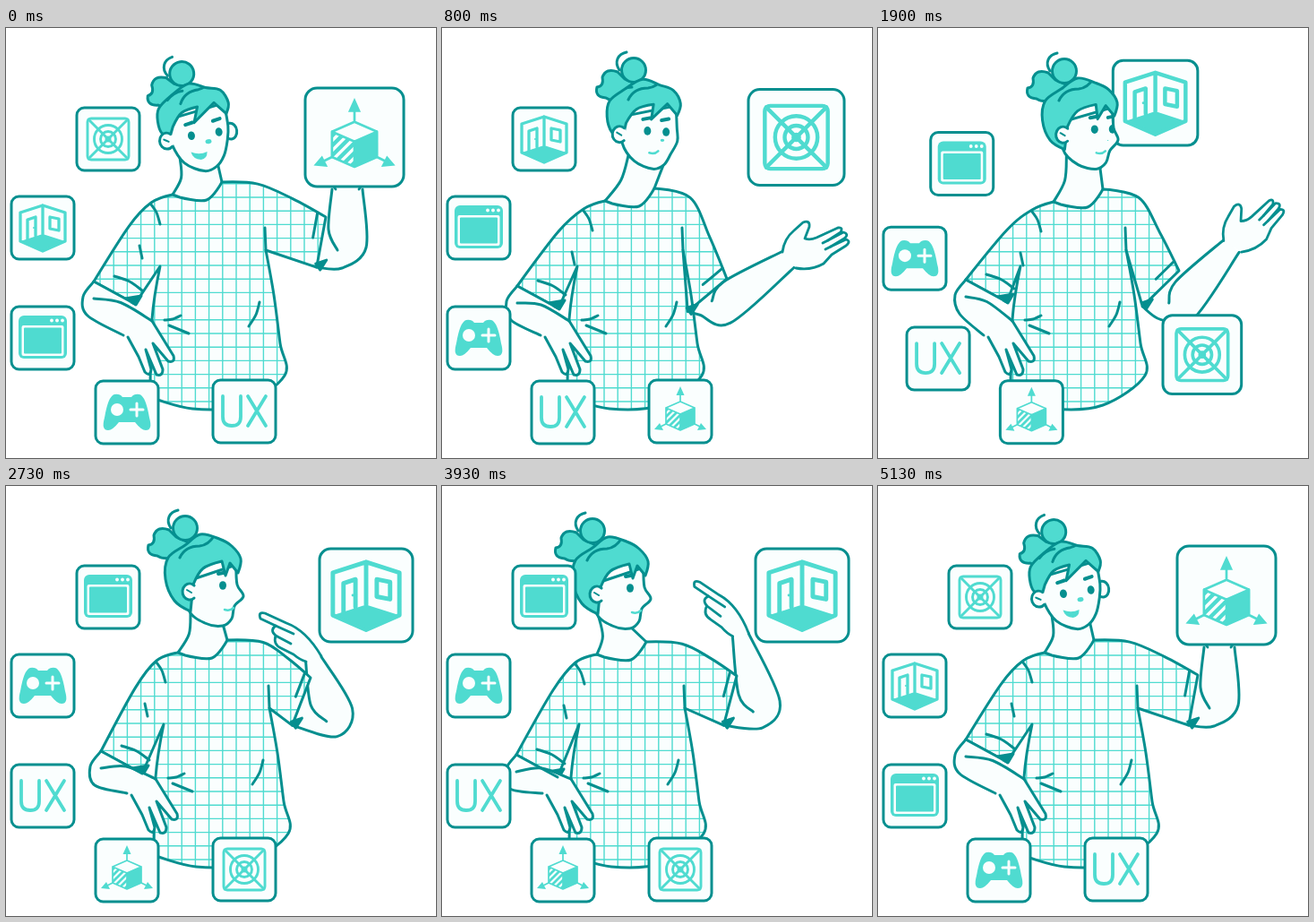
Animation of 480 by 480 pixels, one loop 5210 ms. Source, as an HTML page with a canvas:

```html
<!DOCTYPE html>
<html lang="en">
<head>
<meta charset="utf-8">
<title>Designer and floating tiles</title>
<style>
  html, body { margin: 0; width: 100%; height: 100%; overflow: hidden; background: #fff; }
  canvas { display: block; width: 480px; height: 480px; }
</style>
</head>
<body>
<canvas id="stage" role="img" aria-label="A designer sorting tiles: 3D, target, room, browser, games, UX"></canvas>
<script>
const LOOP = 5210, DARK = '#058f8f', MINT = '#4fdbd0', PALE = '#fafefe';
const canvas = document.getElementById('stage');
const ctx = canvas.getContext('2d');
const dpr = window.devicePixelRatio || 1;
canvas.width = canvas.height = 480 * dpr;

/* ---------- maths ---------- */
const clamp = (v, a = 0, b = 1) => Math.min(b, Math.max(a, v));
const mix = (a, b, p) => Array.isArray(a) ? a.map((v, i) => mix(v, b[i], p)) : a + (b - a) * p;
const add = (a, b) => [a[0] + b[0], a[1] + b[1]];
const sub = (a, b) => [a[0] - b[0], a[1] - b[1]];
const unit = v => v.map(c => c / Math.hypot(...v));
const spin = ([x, y], a) => [x * Math.cos(a) - y * Math.sin(a), x * Math.sin(a) + y * Math.cos(a)];
// step from a point: u along a unit vector, n across it
const step = (p, dir, u, n) => [p[0] + dir[0] * u - dir[1] * n, p[1] + dir[1] * u + dir[0] * n];
const span = (t, a, b) => clamp((t - a) / (b - a));
const inOut = x => x < .5 ? 2 * x * x : 1 - 2 * (1 - x) ** 2;
const outBack = x => 1 + 3.6 * (x - 1) ** 3 + 2.6 * (x - 1) ** 2;
const inBack = x => 2.9 * x ** 3 - 1.9 * x * x;
const points = s => s.split(' ').map(p => p.split(',').map(Number));

/* ---------- drawing helpers ---------- */
function spline(pts, closed = false, corners = []) {
  const n = pts.length, path = new Path2D();
  const at = i => closed ? pts[(i + n) % n] : pts[clamp(i, 0, n - 1)];
  const tangent = i => corners.includes(i % n) ? [0, 0] : sub(at(i + 1), at(i - 1)).map(v => v / 6);
  path.moveTo(...pts[0]);
  for (let i = 0; i < (closed ? n : n - 1); i++)
    path.bezierCurveTo(...add(at(i), tangent(i)), ...sub(at(i + 1), tangent(i + 1)), ...at(i + 1));
  if (closed) path.closePath();
  return path;
}
const svg = d => new Path2D(d);
function fill(path, color) { ctx.fillStyle = color; ctx.fill(path); }
function stroke(path, color = DARK, width = 3) {
  ctx.strokeStyle = color;
  ctx.lineWidth = width;
  ctx.stroke(path);
}
function line(a, b, color, width) { stroke(spline([a, b]), color, width); }
function shape(path, color = PALE) { fill(path, color); stroke(path); }
function oval(x, y, rx, ry = rx, from = 0, to = 7) {
  const p = new Path2D();
  p.ellipse(x, y, rx, ry, 0, from, to);
  return p;
}
function box(x, y, w, h, r) {
  const p = new Path2D();
  p.roundRect(x, y, w, h, r);
  return p;
}
function placed([x, y], draw, turn = 0, scale = 1) {
  ctx.save();
  ctx.translate(x, y);
  ctx.rotate(turn * Math.PI / 180);
  ctx.scale(scale, scale);
  draw();
  ctx.restore();
}
function clipped(path, draw) {
  ctx.save();
  ctx.clip(path);
  draw();
  ctx.restore();
}

/* ---------- poses ---------- */
// turn: 0 faces us, 1 is profile; shift: sideways sway of the torso
const HOLD = { head: [216, 120], tilt: -8, turn: 0, neck: [241, 172], shift: 0, cuffL: [98, 283],
  cuffR: [357, 211], elbow: [381, 245], wrist: [381, 180], girth: 17, hand: 'hold', palm: 0 };
const OFFER = { head: [224, 118], tilt: 0, turn: .35, neck: [237, 179], shift: -21, cuffL: [84, 288],
  cuffR: [318, 280], elbow: [310, 312], wrist: [387, 258], girth: 11, hand: 'open', palm: 0 };
const SWEEP = { ...OFFER, head: [218, 119], turn: .8, neck: [251, 180], shift: -13, cuffL: [98, 281],
  cuffR: [336, 271], elbow: [335, 312], wrist: [395, 243], palm: -18 };
const POINT = { head: [210, 118], tilt: 0, turn: 1, neck: [247, 172], shift: 4, cuffL: [106, 296],
  cuffR: [340, 214], elbow: [367, 256], wrist: [343, 193], girth: 9, hand: 'point', palm: 0 };
const LEAN = { ...POINT, head: [178, 121], neck: [228, 174], shift: -19, cuffL: [83, 300],
  cuffR: [329, 212], elbow: [357, 246], wrist: [333, 166], palm: 9 };
const LIFT = { ...HOLD, head: [238, 120], tilt: 0, neck: [259, 174], shift: 5, cuffL: [108, 270],
  cuffR: [355, 248], elbow: [365, 283], wrist: [393, 203], girth: 13 };

const KEYS = [[0, HOLD], [40, HOLD], [700, OFFER], [1250, OFFER], [1900, SWEEP], [1960, SWEEP],
  [2600, POINT], [2900, POINT], [3800, LEAN], [3960, LEAN], [4600, LIFT], [4740, LIFT], [5130, HOLD], [LOOP, HOLD]];

function poseAt(t) {
  const i = Math.max(1, KEYS.findIndex(([time]) => t < time));
  const [[from, a], [to, b]] = [KEYS[i - 1], KEYS[i]];
  const p = inOut(span(t, from, to)), pose = {};
  for (const k in a) pose[k] = k === 'hand' ? (p < .5 ? a : b).hand : mix(a[k], b[k], p);
  return pose;
}

/* ---------- body ---------- */
const SHIRT_CORNERS = [0, 3, 4, 5, 7, 13, 14, 15, 18, 20];

// the whole shirt follows from the neck, the sway and the two cuffs
function shirtOf({ neck, shift, cuffL, cuffR }) {
  const low = s => points(s).map(([x, y]) => [x + shift, y]);
  const shoulderL = add(neck, [-79, 23]);
  const shoulderR = add(neck, [40, 2 + .12 * (cuffR[1] - 210)]);
  const cuffDir = spin(unit(sub(cuffR, shoulderR)), 1.3);
  return [
    add(neck, [-55, 14]), shoulderL, add(mix(shoulderL, cuffL, .35), [-2, -5]),
    cuffL, add(cuffL, [46, 25]),
    ...low('172,266 163,325 161,412 208,425 264,421 311,388 306,352 299,298 290,248'),
    step(cuffR, cuffDir, 57, 0), cuffR, add(mix(shoulderR, cuffR, .5), [1, -2]), shoulderR,
    neck, add(neck, [-17, 20]), add(neck, [-47, 17])
  ];
}

const HANDS = {
  hold: [svg('M-13,0L-22,-13L-27,-34H25L21,-12L13,0'),
    svg('M-14,-34Q-13,-21 -7,-23Q-2,-25 -3,-34M8,-34Q10,-24 14,-34')],
  open: [svg('M-7,-8Q-5,-23 6,-32L16,-41Q24,-44 23,-36L18,-23Q24,-21 31,-24L55,-35Q61,-36 58,-30L44,-21L61,-30Q68,-28 62,-23L47,-14L64,-22Q70,-20 64,-15L48,-5L39,5Q25,13 8,10'),
    svg('M44,-21L38,-18M47,-14L41,-11')],
  point: [svg('M9,-3Q-8,-32 -30,-40L-54,-51Q-62,-53 -59,-45L-42,-37Q-49,-32 -42,-26Q-45,-16 -36,-12L-22,-5Q-15,1 -8,3'),
    svg('M-42,-37L-22,-28M-42,-26L-25,-17')]
};
const HIP_HAND = svg('M163,324L187,363Q189,371 181,369L164,349L175,378Q175,386 168,384L156,356L162,378Q161,387 155,381L148,364L136,342');

function drawArm({ elbow, wrist, girth, hand, palm }, shirt) {
  const dir = unit(sub(wrist, elbow));
  const outer = [shirt[14], step(elbow, dir, -23, -6), step(elbow, dir, 0, 21), step(wrist, dir, 0, girth)];
  const inner = [step(wrist, dir, 0, -girth), step(elbow, dir, 20, -21), step(elbow, dir, -3, -11)];
  fill(spline([...outer, ...inner.slice(0, 2), shirt[15]], true, [0, 3, 4, 6]), PALE);
  stroke(spline(outer));
  stroke(spline(inner));
  placed(wrist, () => {
    fill(HANDS[hand][0], PALE);
    HANDS[hand].forEach(p => stroke(p, DARK, 2.8));
  }, palm);
}

function drawNeck({ head, turn, neck }, shirt) {
  const left = add(head, mix([-22, 24], [-4, 22], turn));
  const right = add(head, mix([20, 30], [32, 36], turn));
  const side = [left, add(mix(left, shirt[0], .55), [6, 0]), shirt[0]];
  fill(spline([...side, shirt[20], shirt[19], neck, right], true), PALE);
  stroke(spline(side));
  line(right, neck);
}

function drawShirt(pose, shirt) {
  const path = spline(shirt, true, SHIRT_CORNERS);
  fill(path, PALE);
  clipped(path, () => {
    const grid = new Path2D();
    for (let v = 13.8; v < 480; v += 15.2) {
      grid.moveTo(v, 160); grid.lineTo(v, 440);
      grid.moveTo(60, v + 8); grid.lineTo(400, v + 8);
    }
    stroke(grid, MINT, 1.4);
  });
  stroke(path);

  const crease = (p, ...offsets) => stroke(spline(offsets.map(o => add(p, o))));
  const [, shoulder, , cuffL, , , waistL] = shirt;
  crease(shoulder, [0, 2], [6, 11], [10, 24]);
  crease(shoulder, [-13, 48], [-10, 62]);
  crease(cuffL, [23, -6], [40, 0], [54, 10]);
  crease(waistL, [14, 1], [23, 0], [32, -4]);
  crease(waistL, [19, 7], [41, 16]);
  crease(shirt[13], [-1, -25], [0, 0]);
  crease(shirt[11], [-23, -46], [-27, -32], [-35, -19]);

  const [inner, outer, upper] = shirt.slice(14, 17);
  const lift = sub(upper, outer).map(v => v * .25);
  line(add(outer, lift), add(mix(inner, outer, .5), lift));
  const shade = (p, ...offsets) => shape(spline(offsets.map(o => add(p, o)), true, [0, 1, 2]), DARK);
  shade(shirt[4], [-11, -6], [7, -9], [1, 1]);
  shade(inner, [-1, -4], [11, -8], [4, 3]);
}

function drawHipArm({ shift, cuffL }, shirt) {
  const palm = [shift, 3], mid = mix(cuffL, add([98, 283], palm), .5);
  const top = add([163, 324], palm), wrist = add([131, 340], palm);
  const elbow = [cuffL, add(cuffL, [-12, 17]), add(cuffL, [-7, 38]), wrist];
  const crease = [top, add(mid, [30, 22]), add(cuffL, [0, 19])];
  fill(spline([...elbow, add([136, 342], palm), ...crease.slice(0, 2), shirt[4]], true, [0, 3, 4, 5, 7]), PALE);
  placed(palm, () => shape(HIP_HAND));
  stroke(spline(elbow));
  stroke(spline(crease));
  line(cuffL, shirt[4]);
}

/* ---------- head, around a point between the eyes ---------- */
const FACE = [
  points('-35,-22 -32,5 -21,28 0,40 14,37 24,26 30,10 33,-6 32,-32'),
  points('-4,-13 -6,20 12,35 32,38 42,30 45,16 55,5 48,-8 47,-30')
];
const CAP = [
  points('-32,-5 -41,-8 -44,-22 -41,-36 -26,-48 -4,-59 14,-52 30,-47 37,-32 33,-20 21,-34 -4,-15 2,-32 -16,-28 -28,-14'),
  points('-4,22 -22,10 -32,-14 -29,-38 -10,-52 7,-64 28,-59 42,-51 52,-37 49,-21 40,-32 35,-18 31,-34 10,-26 -1,-8')
];
const PUFF = svg('M-8,32Q-24,36 -31,31Q-44,30 -41,19Q-33,18 -35,8Q-31,-3 -18,2Q-14,6 -10,10L8,18');
const STRAND = svg('M-8,-20C-18,-18 -22,-9 -16,0');
const CURLS = svg('M-34,-62Q-29,-52 -18,-55M-16,-38Q-10,-51 6,-51Q16,-52 22,-62M-30,-44Q-22,-52 -12,-52');

function drawEar(x, y) {
  fill(oval(x, y, 8, 9), PALE);
  stroke(oval(x, y, 8, 9, .9, 5.4));
  line([x - 3, y - 2], [x + 2, y + 1], DARK, 2);
}

function drawHead({ head, tilt, turn }) {
  const at = (front, side, p = turn) => mix(front, side, p);
  const face = spline(at(...FACE), true, [0, 8]);
  const cap = spline(at(...CAP), true, [0, 9, 10, 11, 12, 14]);
  placed(head, () => {
    shape(oval(...at([35, 0], [20, -2]), 7, 9));
    placed([-10, -71], () => {
      shape(PUFF, MINT);
      shape(oval(0, 0, 13.5), MINT);
      stroke(STRAND);
    });
    shape(face);
    clipped(face, () => {
      // the far eye slips past the edge of the face as the head turns
      for (const [x, y] of [at([-9, -1], [32, -7]), at([22, -1], [56, -9], turn * turn)]) {
        fill(oval(x, y, 4, 4.8), DARK);
        line([x - 5, y - 13], [x + 3, y - 14.5], DARK, 4);
      }
    });
    fill(oval(...at([9, 8], [46, 6]), 3.5 * (1 - turn), 2.5 * (1 - turn)), MINT);
    placed(at([-3, 21], [38, 19]), () => {
      if (turn > .17) stroke(svg('M-4,1Q2,3 6,-1'), MINT, 2.5);
      else fill(svg('M-9,-4Q0,1 9,-2Q8,6 1,6Q-8,4 -9,-4Z'), MINT);
    });
    shape(cap, MINT);
    clipped(cap, () => stroke(CURLS));
    drawEar(...at([-37, 1], [-5, 0]));
  }, tilt);
}

/* ---------- tiles ---------- */
const ICONS = [
  function cube() {
    fill(svg('M0,3L16,-4V14L0,21Z'), MINT);
    clipped(svg('M0,3L-16,-4V14L0,21Z'), () => {
      for (let y = -8; y < 40; y += 7) line([-17, y + 8], [1, y - 10], MINT, 2.8);
    });
    stroke(svg('M0,-11L16,-4V14L0,21L-16,14V-4ZM-16,-4L0,3L16,-4M0,3V21M0,-11V-21M-16,14L-24,18M16,14L24,18'), MINT, 1.7);
    fill(svg('M0,-28L4.5,-18H-4.5ZM-29,20L-23,13L-19,21ZM29,20L23,13L19,21Z'), MINT);
  },
  function target() {
    for (const p of [box(-23, -23, 46, 46, 4), oval(0, 0, 15.5), oval(0, 0, 8.5), svg('M-22,-22L22,22M22,-22L-22,22')])
      stroke(p, MINT, 2.9);
    fill(oval(0, 0, 3.5), MINT);
  },
  function room() {
    fill(svg('M-25,15L0,7L25,15L0,26Z'), MINT);
    stroke(svg('M0,7V-25L-25,-17V15L0,26L25,15V-17L0,-25M-17,13V-9L-8,-12V9M8,-12L18,-10V3L8,1Z'), MINT, 3.3);
    fill(oval(-10, 0, 1), MINT);
  },
  function browser() {
    fill(box(-27, -25, 54, 48, 6), MINT);
    fill(box(-23.5, -14, 47, 34, 2), PALE);
    fill(box(-21, -11.5, 42, 29, 1), MINT);
    for (const x of [10, 16, 22]) fill(oval(x, -19.5, 1.9), PALE);
  },
  function gamepad() {
    fill(svg('M-14,-20Q-8,-21 -5,-17H5Q8,-21 14,-20Q21,-18 25,6Q29,20 21,20Q16,20 9,11H-9Q-16,20 -21,20Q-29,20 -25,6Q-21,-18 -14,-20Z'), MINT);
    fill(oval(-11, -3, 7), PALE);
    stroke(svg('M4,-3H18M11,-10V4'), PALE, 3);
  },
  function ux() {
    stroke(svg('M-24,-17V6Q-24,16 -14,16Q-4,16 -4,6V-17M4,-17L24,16M24,-17L4,16'), MINT, 3.8);
  }
];

// ring of places; place 0 is the large one, a little further right after each swipe
const RING = points('389,122 114,124 41,223 41,346 135,429 266,428');
const SWIPES = [[40, 780], [1300, 2258]];
const REBUILD = 4440;
const slotOf = (i, ring) => (i - ring + 6) % 6;
function place(i, ring) {
  const slot = slotOf(i, ring), [x, y] = RING[slot];
  return slot ? [x, y, 70] : [x + 6.5 * ring, y, 110 - 3 * ring];
}
const curve = (a, c, b, p) => mix(mix(a, c, p), mix(c, b, p), p);

function swipedTile(i, t) {
  const ring = t < 1000 ? 0 : 1, slot = slotOf(i, ring);
  const p = inOut(span(t, ...SWIPES[ring]));
  const a = place(i, ring), b = place(i, ring + 1);
  if (slot > 1) return mix(a, b, p);
  const via = slot ? [227, 26] : [480, 329];
  return [...curve(a.slice(0, 2), via, b.slice(0, 2), p), mix(a[2], b[2], slot ? p : p * p)];
}

function tileAt(i, t) {
  if (t < SWIPES[1][1]) return swipedTile(i, t);
  const late = t >= REBUILD, ring = late ? 0 : 2, slot = slotOf(i, ring);
  const [x, y, size] = place(i, ring);
  if (!late) return [x, y, size * (1 - inBack(span(t - slot * 15, 3960, 4340)))];
  if (slot) return [x, y, size * outBack(span(t - (5 - slot) * 22, 4701, 5001))];
  return [x + 4 * (1 - span(t, 4740, 5100)), y, size * (1 - (1 - span(t, 4480, 4900)) ** 2)];
}

function drawTile(i, t) {
  const [x, y, size] = tileAt(i, t);
  if (size < 2) return;
  placed([x, y], () => {
    const frame = box(-size / 2, -size / 2, size, size, size * .12);
    fill(frame, PALE);
    stroke(frame, DARK, 3 * clamp(size / 60, .2, 1));
  });
  placed([x, y], ICONS[i], 0, size / 70);
}

// the tile travelling over the top passes behind the head
const behind = t => t < 900 ? 1 : t < 2400 ? 2 : -1;

function frame(now) {
  const t = now % LOOP, pose = poseAt(t), shirt = shirtOf(pose), back = behind(t);
  ctx.setTransform(dpr, 0, 0, dpr, 0, 0);
  ctx.fillStyle = '#fff';
  ctx.fillRect(0, 0, 480, 480);
  ctx.lineCap = ctx.lineJoin = 'round';
  if (back > 0) drawTile(back, t);
  for (const draw of [drawArm, drawNeck, drawShirt, drawHipArm, drawHead]) draw(pose, shirt);
  ICONS.forEach((_, i) => { if (i !== back) drawTile(i, t); });
}

const start = performance.now();
function tick() {
  frame(performance.now() - start);
  requestAnimationFrame(tick);
}
tick();
</script>
</body>
</html>
```
